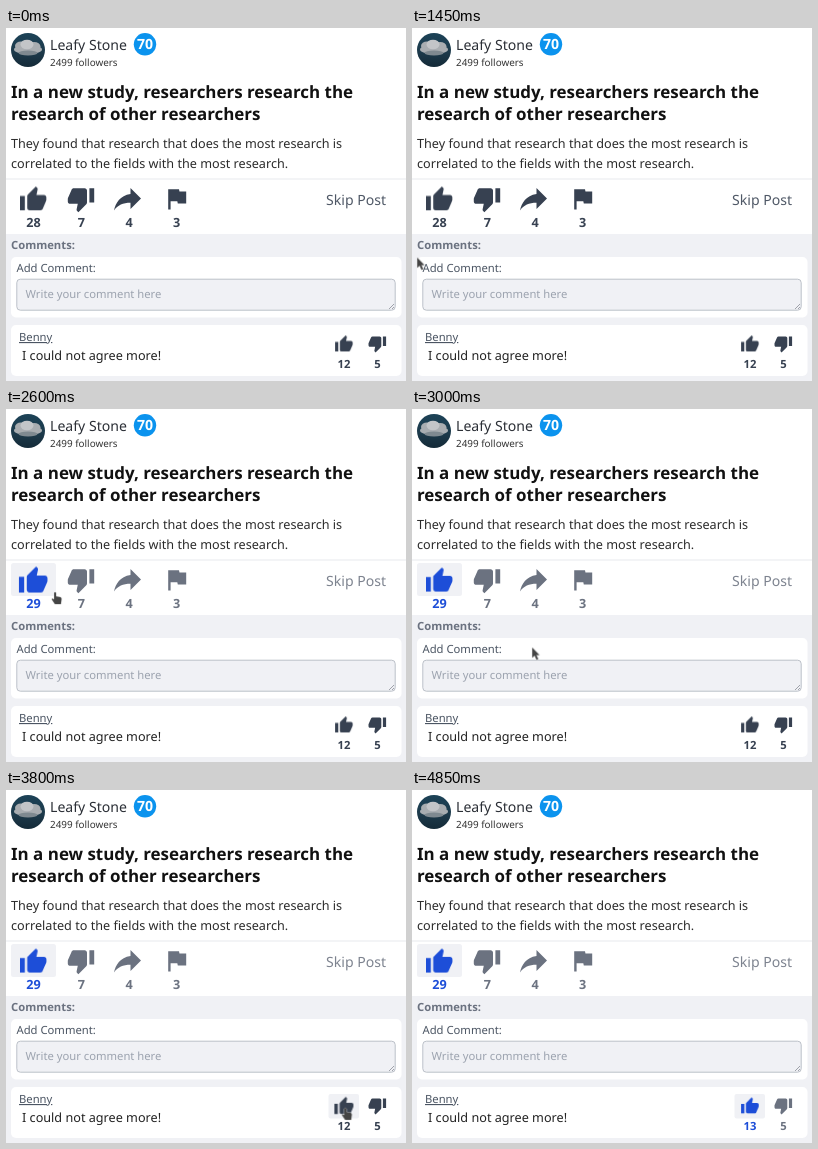
An HTML page that plays this animation: 400x353 px, repeating every 6.15 s.

```html
<!DOCTYPE html>
<html lang="en">
<head>
<meta charset="utf-8">
<title>Post feed</title>
<style>
  :root { --ink: #374151; --soft: #4b5563; --dim: #6b7280; --blue: #1d4ed8; --panel: #f0f1f5; }
  html, body { margin: 0; width: 100%; height: 100%; overflow: hidden; background: #fff; }
  svg { display: block; width: 400px; height: 353px; }
  text { font-family: "Noto Sans", "Open Sans", sans-serif; font-size: 11.25px; text-rendering: geometricPrecision; }
  .sm { font-size: 9.9px; }
  .lg { font-size: 12.65px; }
  .xl { font-size: 14.08px; }
  .title { font-size: 16.95px; font-weight: 700; }
  .count { font-weight: 700; text-anchor: middle; }
  .soft { fill: var(--soft); }

  .anim { animation: 6150ms linear infinite; }
  .step { animation-timing-function: step-end; }
  .grow { transform-box: fill-box; transform-origin: center; }

  /* post: hover 1700, click 2125, leave 2640 */
  .post-bg { animation-name: post-bg; }
  .post-like { animation-name: post-like; }
  .post-dim { animation-name: post-dim; }
  .post-grow { animation-name: post-grow; }
  .post-old { animation-name: post-old; }
  .post-new { animation-name: post-new; }
  @keyframes post-bg { 0%, 27.3% { opacity: 0 } 28.8%, 100% { opacity: 1 } }
  @keyframes post-like { 0%, 34.55% { fill: var(--ink) } 36.99%, 100% { fill: var(--blue) } }
  @keyframes post-dim { 0%, 34.55% { fill: var(--ink) } 36.99%, 100% { fill: var(--dim) } }
  @keyframes post-grow {
    0%, 27.3% { transform: scale(1) }
    29.7%, 42.9% { transform: scale(1.08) }
    45.3%, 100% { transform: scale(1) }
  }
  @keyframes post-old { 0% { opacity: 1 } 34.55%, 100% { opacity: 0 } }
  @keyframes post-new { 0% { opacity: 0 } 34.55%, 100% { opacity: 1 } }

  /* comment: hover 3650, click 4280, leave 4690 */
  .note-bg { animation-name: note-bg; }
  .note-like { animation-name: note-like; }
  .note-dim { animation-name: note-dim; }
  .note-grow { animation-name: note-grow; }
  .note-old { animation-name: note-old; }
  .note-new { animation-name: note-new; }
  @keyframes note-bg { 0%, 59.2% { opacity: 0 } 60.7%, 100% { opacity: 1 } }
  @keyframes note-like { 0%, 69.6% { fill: var(--ink) } 71.54%, 100% { fill: var(--blue) } }
  @keyframes note-dim { 0%, 69.6% { fill: var(--ink) } 71.54%, 100% { fill: var(--dim) } }
  @keyframes note-grow {
    0%, 59.2% { transform: scale(1) }
    61.6%, 76.3% { transform: scale(1.08) }
    78.7%, 100% { transform: scale(1) }
  }
  @keyframes note-old { 0% { opacity: 1 } 69.6%, 100% { opacity: 0 } }
  @keyframes note-new { 0% { opacity: 0 } 69.6%, 100% { opacity: 1 } }

  .cursor { animation-name: travel; }
  .arrow { animation-name: arrow; }
  .hand { animation-name: hand; }
  @keyframes travel {
    0% { transform: translate(-20px, 230px); animation-timing-function: step-end }
    23.55% { transform: translate(5px, 230px); animation-timing-function: cubic-bezier(.3, .4, .4, 1) }
    32.2%, 37.89% { transform: translate(39px, 174px); animation-timing-function: cubic-bezier(.5, .1, .8, .7) }
    42.28% { transform: translate(49px, 183px); animation-timing-function: cubic-bezier(.4, .3, .7, .7) }
    44.72% { transform: translate(68px, 205px); animation-timing-function: cubic-bezier(.4, .25, .75, .65) }
    55.28% { transform: translate(244px, 318px) }
    56.1% { transform: translate(270px, 321.5px); animation-timing-function: cubic-bezier(.2, .6, .4, 1) }
    65.85%, 74.4% { transform: translate(346px, 317.5px); animation-timing-function: cubic-bezier(.45, .1, .8, .8) }
    78.7%, 100% { transform: translate(349px, 358px) }
  }
  @keyframes arrow {
    0% { opacity: 1 } 27.6% { opacity: 0 } 42.9% { opacity: 1 }
    59.3% { opacity: 0 } 76.3%, 100% { opacity: 1 }
  }
  @keyframes hand {
    0% { opacity: 0 } 27.6% { opacity: 1 } 42.9% { opacity: 0 }
    59.3% { opacity: 1 } 76.3%, 100% { opacity: 0 }
  }
</style>
</head>
<body>
<svg viewBox="0 0 400 353">
  <defs>
    <path id="thumb" d="M1 21h4V9H1v12zm22-11c0-1.1-.9-2-2-2h-6.31l.95-4.57.03-.32c0-.41-.17-.79-.44-1.06L14.17 1 7.59 7.59C7.22 7.95 7 8.45 7 9v10c0 1.1.9 2 2 2h9c.83 0 1.54-.5 1.84-1.22l3.02-7.05c.09-.23.14-.47.14-.73v-2z"/>
    <linearGradient id="sky" x2="0" y2="1">
      <stop stop-color="#1c4257"/>
      <stop offset=".55" stop-color="#1d3a4b"/>
      <stop offset="1" stop-color="#142a38"/>
    </linearGradient>
  </defs>
  <rect width="400" height="353" fill="#fff"/>

  <!-- post -->
  <circle cx="22" cy="22" r="17" fill="url(#sky)"/>
  <g fill="#a9adb1">
    <ellipse cx="22" cy="21.5" rx="14" ry="4.5"/>
    <ellipse cx="15" cy="18" rx="6" ry="4.5"/>
    <ellipse cx="28" cy="18.5" rx="6.5" ry="4.5"/>
    <ellipse cx="21" cy="16.5" rx="6.5" ry="4.8" fill="#c3c5c8"/>
    <ellipse cx="22" cy="25" rx="9.5" ry="2.5" fill="#7f8990"/>
  </g>
  <text class="xl" x="44" y="21.5" fill="#2b2f36">Leafy Stone</text>
  <text class="sm" x="44" y="38" fill="#333">2499 followers</text>
  <circle cx="139" cy="16.3" r="11.2" fill="#0b93ee"/>
  <text class="xl" x="139" y="21.2" text-anchor="middle" font-weight="600" fill="#fff">70</text>
  <g fill="#111">
    <text class="title" x="5" y="70">In a new study, researchers research the</text>
    <text class="title" x="5" y="92.4">research of other researchers</text>
  </g>
  <g fill="#2b2b2b">
    <text class="lg" x="5" y="120">They found that research that does the most research is</text>
    <text class="lg" x="5" y="139.6">correlated to the fields with the most research.</text>
  </g>
  <rect y="150.5" width="400" height="1" fill="#e8eaee"/>

  <!-- post actions -->
  <rect class="anim post-bg" x="5" y="154" width="45" height="33" rx="2.5" fill="var(--panel)"/>
  <g class="anim post-like">
    <g transform="translate(12.8 157.3) scale(1.2)"><use class="anim grow post-grow" href="#thumb"/></g>
    <text class="count lg anim step post-old" x="27.5" y="199">28</text>
    <text class="count lg anim step post-new" x="27.5" y="199">29</text>
  </g>
  <g class="anim post-dim">
    <use href="#thumb" transform="translate(60.6 156.6) scale(1.2) rotate(180 12 12)"/>
    <path transform="translate(103.5 152.5) scale(1.5)" d="M14 9V5l7 7-7 7v-4.1c-5 0-8.5 1.6-11 5.1 1-5 4-10 11-11z"/>
    <path transform="translate(156.2 156.4) scale(1.2)" d="M14.4 6L14 4H5v17h2v-7h5.6l.4 2h7V6z"/>
    <text class="count lg" x="75.3" y="199">7</text>
    <text class="count lg" x="123" y="199">4</text>
    <text class="count lg" x="170.5" y="199">3</text>
    <text class="xl" x="320" y="177" fill-opacity=".88">Skip Post</text>
  </g>

  <!-- comments -->
  <rect y="206" width="400" height="147" fill="var(--panel)"/>
  <text x="5" y="221" font-weight="700" fill="#6b7280">Comments:</text>
  <rect x="5" y="229" width="390.5" height="60.5" rx="5" fill="#fff"/>
  <text class="soft" x="10.5" y="243.5">Add Comment:</text>
  <rect x="10.8" y="251.2" width="378.4" height="31" rx="3.5" fill="var(--panel)" stroke="#bcc1c9"/>
  <path d="M383 281l5-5M386 281l2-2" stroke="#8b8f97" stroke-width=".8"/>
  <text x="19.5" y="270" fill="#9ca3af">Write your comment here</text>

  <rect x="5" y="297" width="390.5" height="51" rx="5" fill="#fff"/>
  <text class="soft" x="13" y="313" text-decoration="underline">Benny</text>
  <text class="lg" x="16" y="332" fill="#222">I could not agree more!</text>
  <rect class="anim note-bg" x="322.5" y="304" width="30.5" height="24.5" rx="2" fill="var(--panel)"/>
  <g class="anim note-like">
    <g transform="translate(328.3 306.6) scale(.8)"><use class="anim grow note-grow" href="#thumb"/></g>
    <text class="count anim step note-old" x="338" y="340">12</text>
    <text class="count anim step note-new" x="338" y="340">13</text>
  </g>
  <g class="anim note-dim">
    <use href="#thumb" transform="translate(361.7 306) scale(.8) rotate(180 12 12)"/>
    <text class="count" x="371.5" y="340">5</text>
  </g>

  <g class="anim cursor" fill="#444" stroke="#e4e4e4" stroke-width=".7" stroke-linejoin="round" paint-order="stroke">
    <path class="anim step arrow" d="M0 0v10.2l2.4-2.1 1.9 4.2 1.8-.8-1.9-4H7.3z"/>
    <path class="anim step hand" d="M-1 .8q1-1.6 2 0v3.4l4.3.9q1.2.4 1.2 1.7L5.8 12H-.2L-3.2 7.6q-.3-1.5 1-1.1L-1 7.6z"/>
  </g>
</svg>
</body>
</html>
```
